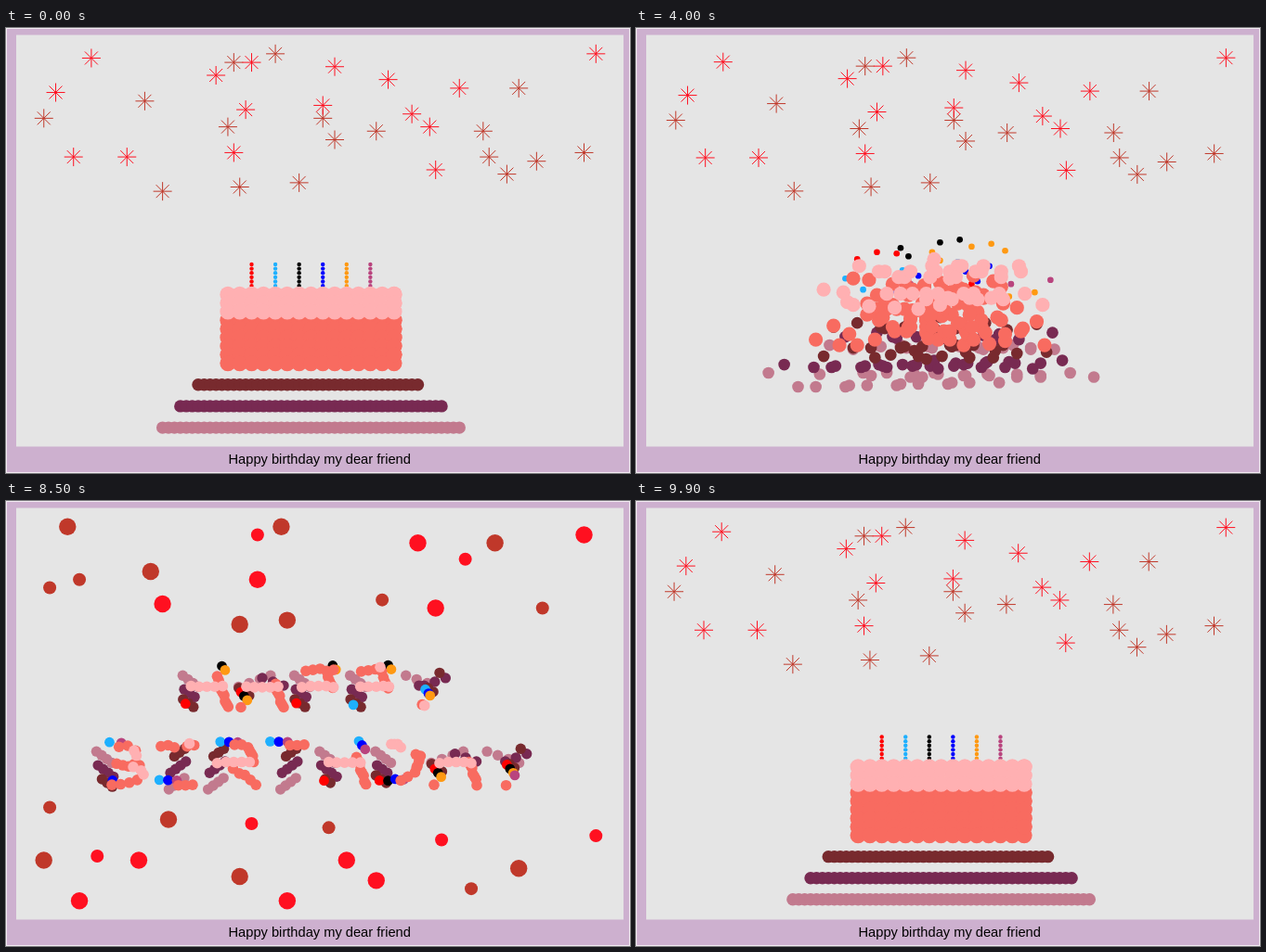
An HTML page with a canvas that plays this animation: 672 by 480 pixels, repeating every 10000 ms.

```html
<!DOCTYPE html>
<html lang="en">
<head>
<meta charset="utf-8">
<title>Happy birthday</title>
<style>
html, body { margin: 0; width: 100%; height: 100%; overflow: hidden; background: #fff; }
canvas { display: block; }
</style>
</head>
<body>
<canvas id="stage" width="672" height="480"></canvas>
<script>
const ctx = document.getElementById('stage').getContext('2d');
const RED = '#ff1020', RUST = '#c0382a';
const range = (from, to, fn) => {
  const step = to < from ? -1 : 1;
  return Array.from({ length: Math.abs(to - from) + 1 }, (_, i) => fn(from + i * step));
};
const column = (x, from, to) => range(from, to, y => [x, y]);
const row = (y, from, to) => range(from, to, x => [x, y]);
const pairs = list => list.reduce((out, v, i) => (i % 2 ? out[out.length - 1].push(v) : out.push([v]), out), []);

// Each letter is a 7 x 11 grid: strokes in drawing order, then late strokes (pink).
const stem = column(0, 0, 10);
const bar = row(5, 1, 5);
const LETTERS = {
  B: [[...stem, ...range(1, 4, x => [[x, 0], [x, 10]]).flat(), [5, 1], [5, 9], ...bar],
      [[6, 2], [6, 3], [5, 6], [6, 7], [6, 8]]],
  I: [[...column(3, 10, 0), ...row(10, 0, 2), ...row(10, 4, 6), ...row(0, 0, 2), ...row(0, 4, 5)],
      [[6, 0]]],
  R: [[...column(0, 10, 0), ...row(0, 1, 6), ...column(6, 1, 4), ...range(2, 6, x => [x, x + 4])], bar],
  T: [[...column(3, 10, 0), ...row(0, 0, 2), ...row(0, 4, 6)], []],
  H: [[...stem, ...column(6, 0, 10)], bar],
  D: [[...stem, ...row(10, 1, 3), [4, 9], [5, 8], ...column(6, 7, 3), [5, 2]],
      [[4, 1], ...row(0, 3, 1)]],
  A: [[...range(0, 6, x => [x, Math.abs(x - 3)]), ...column(0, 4, 9), null, [0, 10], ...column(6, 4, 10)], bar],
  Y: [[...range(0, 3, x => [x, x]), ...range(3, 6, x => [x, 6 - x]), ...column(3, 4, 10)], []],
  P: [[...stem, ...column(6, 0, 5), ...row(0, 1, 5)], bar]
};

const words = [['BIRTHDAY', 8, 53], ['HAPPY', 23, 33]];
const glyphs = words.flatMap(([word, x0, y0]) => [...word].map((letter, i) => {
  let [main, late] = LETTERS[letter];
  if (word[i - 1] === 'P') {
    late = [main[main.length - 1], ...late];
    main = main.slice(0, -1);
  }
  // The letters' axis starts one unit to the left of the cake's.
  const place = list => list.map(p => p && [p[0] + x0 + i * 10 - 1, p[1] + y0]);
  return [place(main), place(late)];
}));

// Takes the first point of every letter, then the second, and so on.
function interleave(part) {
  const lists = glyphs.map(g => g[part]);
  const longest = Math.max(...lists.map(l => l.length));
  return range(0, longest - 1, j => lists.map(l => l[j]).filter(Boolean)).flat();
}

const dot = (x, y, r, color) => ({ x, y, r, color });
const plate = (y, from, to, color) => range(from, to, x => dot(x, y, 6.7, color));
const candleColors = ['#ff0000', '#1eb0ff', '#000000', '#0000ff', '#ff9912', '#b9447e'];
const base = [
  ...plate(87, 20, 70, '#c27a8e'),
  ...plate(82, 23, 67, '#782a52'),
  ...plate(77, 26, 63, '#782a2e'),
  ...candleColors.flatMap((c, i) => range(55, 49, y => dot(35 + i * 4, y, 2.2, c)))
];
const cakeDot = (i, rows, top, color) =>
  dot(31 + 2 * Math.min(14, Math.floor(i / rows)), top + 2 * (i % rows), 8.6, color);

const main = interleave(0), late = interleave(1);
const morph = [
  ...main.map((to, i) => ({ from: base[i] || cakeDot(i - base.length, 6, 62, '#f86b60'), to })),
  ...late.map((to, i) => ({ from: cakeDot(i, 3, 56, '#ffb0b2'), to }))
];

const stars = [
  [RUST, [0, 15, 17, 11, 20, 32, 32, 2, 39, 0, 31, 17, 33, 31, 43, 30, 47, 15, 49, 20, 56, 18,
    74, 18, 75, 24, 78, 28, 83, 25, 80, 8, 91, 23]],
  [RED, [8, 1, 2, 9, 5, 24, 14, 24, 29, 5, 35, 2, 34, 13, 32, 23, 49, 3, 47, 12, 58, 6,
    62, 14, 65, 17, 66, 27, 70, 8, 93, 0]]
].map(([color, list]) => [color, pairs(list)]);

const confetti = [
  [RED, 9.2, [36, 13, 63, 4, 66, 20, 91, 2, 20, 19, 16, 82, 6, 92, 41, 92, 51, 82, 56, 87]],
  [RED, 7, [36, 2, 71, 8, 9, 81, 35, 73, 67, 77, 93, 76]],
  [RUST, 9.2, [4, 0, 40, 0, 76, 4, 18, 11, 33, 24, 41, 23, 21, 72, 0, 82, 33, 86, 80, 84]],
  [RUST, 7, [1, 15, 6, 13, 57, 18, 84, 20, 1, 69, 48, 74, 72, 89]]
].map(([color, r, list]) => [color, r, pairs(list)]);

const clamp = v => Math.max(0, Math.min(1, v));
const sine = u => (1 - Math.cos(Math.PI * clamp(u))) / 2;

// The axes pan between the two scenes and zoom out a little on the way.
function makeView(s) {
  const bulge = s * (1 - s), ex = 2.2 * bulge, ey = 13.8 * bulge;
  return (x, y) => [
    40.7 + (x + s + ex / 2) / (93 + ex) * 594.6,
    27.7 + (y + ey / 2) / (87 + 5 * s + ey) * 403.6
  ];
}

function disc([x, y], r, color) {
  ctx.fillStyle = color;
  ctx.beginPath();
  ctx.arc(x, y, r, 0, 2 * Math.PI);
  ctx.fill();
}

function star([x, y], color) {
  ctx.strokeStyle = color;
  ctx.lineWidth = 1;
  ctx.beginPath();
  for (const [dx, dy] of [[10, 0], [0, 10], [7, 7], [7, -7]]) {
    ctx.moveTo(x - dx, y - dy);
    ctx.lineTo(x + dx, y + dy);
  }
  ctx.stroke();
}

function drawFrame() {
  ctx.fillStyle = '#cdb0cf';
  ctx.fillRect(0, 0, 672, 480);
  ctx.strokeStyle = '#f3ecf3';
  ctx.lineWidth = 1;
  ctx.strokeRect(0.5, 0.5, 671, 479);
  ctx.fillStyle = '#e5e5e5';
  ctx.fillRect(11, 7.5, 654, 444);
  ctx.fillStyle = '#000';
  ctx.font = '14.67px "Liberation Sans", Arial, sans-serif';
  ctx.textAlign = 'center';
  ctx.fillText('Happy birthday my dear friend', 337.7, 470);
}

function render(now) {
  const frame = Math.floor(now / 100) % 100;
  const t = frame === 0 ? 10000 : frame * 100;
  const toLetters = frame > 0 && frame <= 84;
  const p = toLetters ? clamp((frame - 35) / 15) : 1 - clamp((t / 100 - 84) / 15);
  const s = !toLetters ? 1 - sine((t - 8580) / 1480)
    : t >= 5000 ? 1 : sine((t - 3600) / 1460);
  const view = makeView(s);
  const mix = (a, b) => a + (b - a) * p;

  drawFrame();
  ctx.save();
  ctx.beginPath();
  ctx.rect(11, 7.5, 654, 444);
  ctx.clip();
  for (const { from, to } of morph) {
    disc(view(mix(from.x, to[0]), mix(from.y, to[1])), mix(from.r, 5.6), from.color);
  }
  if (frame < 50 || frame === 99) {
    for (const [color, list] of stars) list.forEach(([x, y]) => star(view(x, y), color));
  } else {
    for (const [color, r, list] of confetti) list.forEach(([x, y]) => disc(view(x - 1, y), r, color));
  }
  ctx.restore();
}

const start = performance.now();
function tick() {
  render(performance.now() - start);
  requestAnimationFrame(tick);
}
tick();
</script>
</body>
</html>
```
